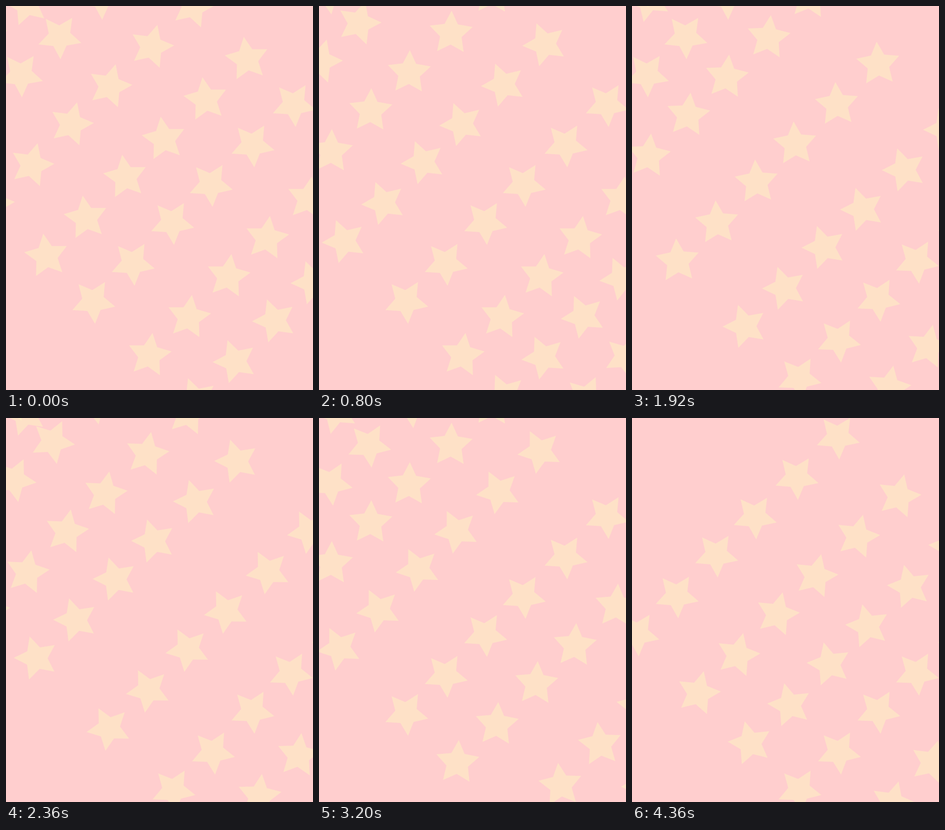
Animation of 669 by 837 pixels, one loop 4400 ms. Source, as an HTML page with a canvas:

```html
<!DOCTYPE html>
<html lang="en">
<head>
<meta charset="utf-8">
<title>Drifting stars</title>
<style>
  html, body { margin: 0; width: 100%; height: 100%; overflow: hidden; background: #ffcece; }
  canvas { display: block; }
</style>
</head>
<body>
<canvas id="stage" width="669" height="837"></canvas>
<script>
const ctx = document.getElementById('stage').getContext('2d');
const STEP = 40, LOOP = 4400, TRAVEL = 109, LEAD = 56.5;
const RADIUS = 49.2, RAD = Math.PI / 180;

// Steps at which each diagonal row passes the middle of its path
const rows = [-21, -11, 0, 9, 20, 32, 43, 56, 70, 80, 93, 103, 113, 125];
// Stars of one row, relative to its top right star
const row = [[0, 0], [-90, 88], [-181, 174], [-265, 257], [-351, 346], [-437, 429]];

function star(cx, cy, turn) {
  ctx.beginPath();
  for (let i = 0; i < 10; i++) {
    const r = i % 2 ? RADIUS / 2 : RADIUS;
    const a = (turn + i * 36) * RAD;
    ctx.lineTo(cx + r * Math.sin(a), cy - r * Math.cos(a));
  }
  ctx.fill();
}

function drawRow(age) {
  const u = (age + LEAD) / TRAVEL;
  if (u < 0 || u > 1) return;
  const s = u * u * (3 - 2 * u);
  const x = 191.4 + 826 * s;
  const y = -212.8 + 823 * s - 23.5 * s * s;
  for (const [dx, dy] of row) star(x + dx, y + dy, 31.4 + 4.42 * age);
}

function draw(now) {
  const step = Math.floor((now % LOOP) / STEP);
  ctx.fillStyle = '#ffcece';
  ctx.fillRect(0, 0, 669, 837);
  ctx.fillStyle = 'rgba(253, 246, 194, 0.5)';
  for (const pass of rows) drawRow(step - pass);
}

let start;
function tick(now) {
  start ??= now;
  draw(now - start);
  requestAnimationFrame(tick);
}
draw(0);
requestAnimationFrame(tick);
</script>
</body>
</html>
```
